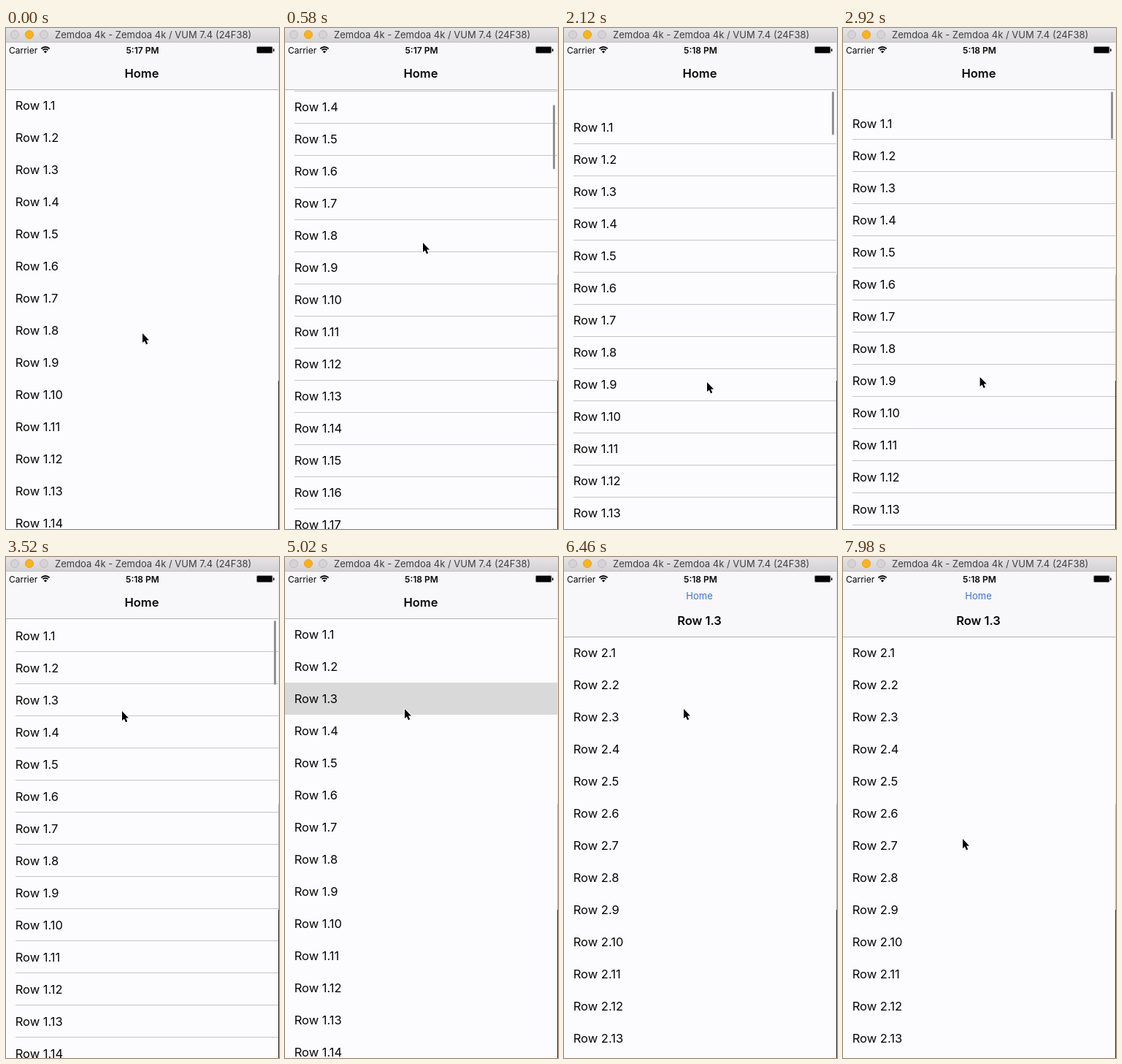
An HTML page with a canvas for the animation above (8000 ms loop, 374 by 686 pixels).

```html
<!DOCTYPE html>
<html lang="en">
<head>
<meta charset="utf-8">
<title>List navigation</title>
<style>
  html, body { margin: 0; width: 100%; height: 100%; overflow: hidden; background: #fcfcfe; }
  canvas { display: block; width: 374px; height: 686px; }
</style>
</head>
<body>
<canvas id="stage" width="374" height="686"></canvas>
<script>
const W = 374, H = 686, LOOP = 8000, ROW = 44, TEXT = 16.5;
const PAPER = '#fcfcfe', BAR = '#f8f8fa', BLACK = '#060606';
const ctx = document.getElementById('stage').getContext('2d');

// Steps are [tick, value, ...]
const SCROLL = [[0, 0], [3, 0], [13, -129.5], [18, -190], [26, -230], [31, -230],
  [46, 30.5], [55, 58], [60, 32], [66, 12], [71, 5], [76, 2], [83, 0]];
const POINTER = [[0, 187, 418], [3, 187, 422], [13, 189, 294], [18, 190, 235], [31, 192, 225],
  [46, 196, 485], [55, 196, 545], [61, 190, 500], [74, 159, 213], [76, 159, 211],
  [100, 164, 208], [143, 164, 208], [160, 164, 386]];
const PUSH = { start: 115, length: 14.3 };

// Uneven playback: three ticks every 140 ms, held 20, 100 and 20 ms.
function tickAt(ms) {
  const rest = ms % 140;
  return 3 * Math.floor(ms / 140) + (rest < 20 ? 0 : rest < 120 ? 1 : 2);
}

const clamp = v => Math.max(0, Math.min(1, v));
const mix = (a, b, p) => a + (b - a) * p;

function sample(steps, tick, column = 1) {
  const next = steps.findIndex(s => s[0] > tick);
  if (next < 0) return steps[steps.length - 1][column];
  const a = steps[next - 1], b = steps[next];
  return mix(a[column], b[column], (tick - a[0]) / (b[0] - a[0]));
}

function pushEase(x) {
  if (x <= 0 || x >= 1) return clamp(x);
  const curve = (s, a, b) => 3 * (1 - s) ** 2 * s * a + 3 * (1 - s) * s * s * b + s ** 3;
  let low = 0, high = 1;
  for (let i = 0; i < 24; i++) {
    const mid = (low + high) / 2;
    if (curve(mid, 0.36, 0.04) < x) low = mid; else high = mid;
  }
  return curve(low, 0.66, 1);
}

function box(x, y, w, h, color) {
  ctx.fillStyle = color;
  ctx.fillRect(x, y, w, h);
}

function roundBox(x, y, w, h, r, color) {
  ctx.beginPath();
  ctx.roundRect(x, y, w, h, r);
  ctx.fillStyle = color;
  ctx.fill();
}

function label(text, x, y, size, { weight = 400, color = BLACK, align = 'left', alpha = 1 } = {}) {
  ctx.globalAlpha = alpha;
  ctx.font = `${weight} ${size}px Inter, "Liberation Sans", sans-serif`;
  ctx.textAlign = align;
  ctx.fillStyle = color;
  ctx.fillText(text, x, y);
  ctx.globalAlpha = 1;
}

function disc(x, y, r, fill, edge) {
  ctx.beginPath();
  ctx.arc(x, y, r, 0, 7);
  ctx.fillStyle = fill;
  ctx.fill();
  ctx.strokeStyle = edge;
  ctx.lineWidth = 1;
  ctx.stroke();
}

function list(section, x, top, scroll, selected) {
  box(x, 20, W, H, PAPER);
  const first = Math.max(0, Math.floor(-scroll / ROW));
  for (let i = first; i < first + 17; i++) {
    const y = top + scroll + i * ROW;
    if (i + 1 === selected) box(x, y, W, ROW, '#d9d9d9');
    label(`Row ${section}.${i + 1}`, x + 12.7, Math.round(y + 27.5), TEXT);
    if (scroll) box(x + 13, Math.round(y + 43), W, 1, '#c5c5c9');
  }
}

function scrollIndicator(scroll, tick) {
  const alpha = clamp((tick - 3) / 3) * clamp((92 - tick) / 6);
  if (!alpha) return;
  ctx.globalAlpha = alpha;
  const top = 87 + Math.max(0, -scroll) * 0.14;
  roundBox(367, top, 3, 88 - Math.max(0, scroll - 2), 1.5, '#929292');
  ctx.globalAlpha = 1;
}

function statusBar(clock) {
  label('Carrier', 4, 34.5, 12);
  label(clock, 187, 34.5, 12, { weight: 600, align: 'center' });
  ctx.strokeStyle = BLACK;
  ctx.lineWidth = 1.8;
  for (const r of [8, 5]) {
    ctx.beginPath();
    ctx.arc(54, 34, r, -Math.PI * 0.75, -Math.PI * 0.25);
    ctx.stroke();
  }
  ctx.fillStyle = BLACK;
  ctx.beginPath();
  ctx.moveTo(54, 34.5);
  ctx.arc(54, 34.5, 3, -Math.PI * 0.75, -Math.PI * 0.25);
  ctx.fill();
  roundBox(343, 25, 22.5, 10, 2, '#8c8c8e');
  roundBox(344, 26, 20.5, 8, 1, BLACK);
  box(366, 28.5, 1.5, 3.5, BLACK);
}

function navigationBar(p) {
  const grown = clamp(p * 1.1), height = Math.round(mix(84, 109, grown));
  const bold = { weight: 600, align: 'center' };
  box(0, 20, W, height - 20, BAR);
  box(0, height, W, 1, '#b4b4b8');
  if (p < 1) label('Home', 186 - 134 * p, 68, TEXT, { ...bold, alpha: Math.max(0.03, 1 - p * 1.5) });
  if (p > 0) {
    label('Home', 185.5, 57.5, 13, { align: 'center', color: '#3d6fe0', alpha: grown });
    label('Row 1.3', 185.5 + 220 * (1 - p), height - 16, TEXT, { ...bold, alpha: grown });
  }
}

function windowTitle() {
  const shade = ctx.createLinearGradient(0, 0, 0, 20);
  shade.addColorStop(0, '#e6e4e6');
  shade.addColorStop(1, '#d3d1d3');
  box(0, 0, W, 20, shade);
  box(0, 19, W, 1, '#c2c0c4');
  disc(12, 9, 5.5, '#d5d3d5', '#bebcbe');
  disc(32, 9, 5.5, '#fdb315', '#e6a01c');
  disc(52, 9, 5.5, '#d5d3d5', '#bebcbe');
  label('Zemdoa 4k - Zemdoa 4k / VUM 7.4 (24F38)', 67, 14, 13, { color: '#3e3e40' });
}

function rightEdge() {
  box(373, 20, 1, 318, '#e6e6e8');
  box(373, 338, 1, 145, '#b4b4b4');
  box(373, 483, 1, 203, '#2b2b2b');
}

function pointer(x, y) {
  ctx.save();
  ctx.translate(x, y);
  ctx.beginPath();
  [[0, 0], [0, 13], [2.9, 10.4], [5, 15.2], [7.2, 14.2], [5.1, 9.6], [9, 9.4]]
    .forEach(([px, py]) => ctx.lineTo(px, py));
  ctx.closePath();
  ctx.lineJoin = 'round';
  ctx.lineWidth = 2;
  ctx.strokeStyle = '#fff';
  ctx.stroke();
  ctx.fillStyle = '#000';
  ctx.fill();
  ctx.restore();
}

function draw(tick) {
  const scroll = sample(SCROLL, tick);
  const p = pushEase((tick - PUSH.start) / PUSH.length);
  if (p < 1) {
    list(1, -112 * p, 84, scroll, tick >= 105 ? 3 : 0);
    scrollIndicator(scroll, tick);
  }
  if (p > 0) {
    ctx.globalAlpha = p * 0.1;
    box(0, 20, W, H, '#000');
    ctx.globalAlpha = 1;
    list(2, Math.round(W * (1 - p)), 109, 0, 0);
  }
  navigationBar(p);
  statusBar(tick < 30 ? '5:17 PM' : '5:18 PM');
  windowTitle();
  rightEdge();
  pointer(sample(POINTER, tick, 1), sample(POINTER, tick, 2));
}

const begin = performance.now();
function play() {
  draw(tickAt((performance.now() - begin) % LOOP));
  requestAnimationFrame(play);
}
play();
</script>
</body>
</html>
```
